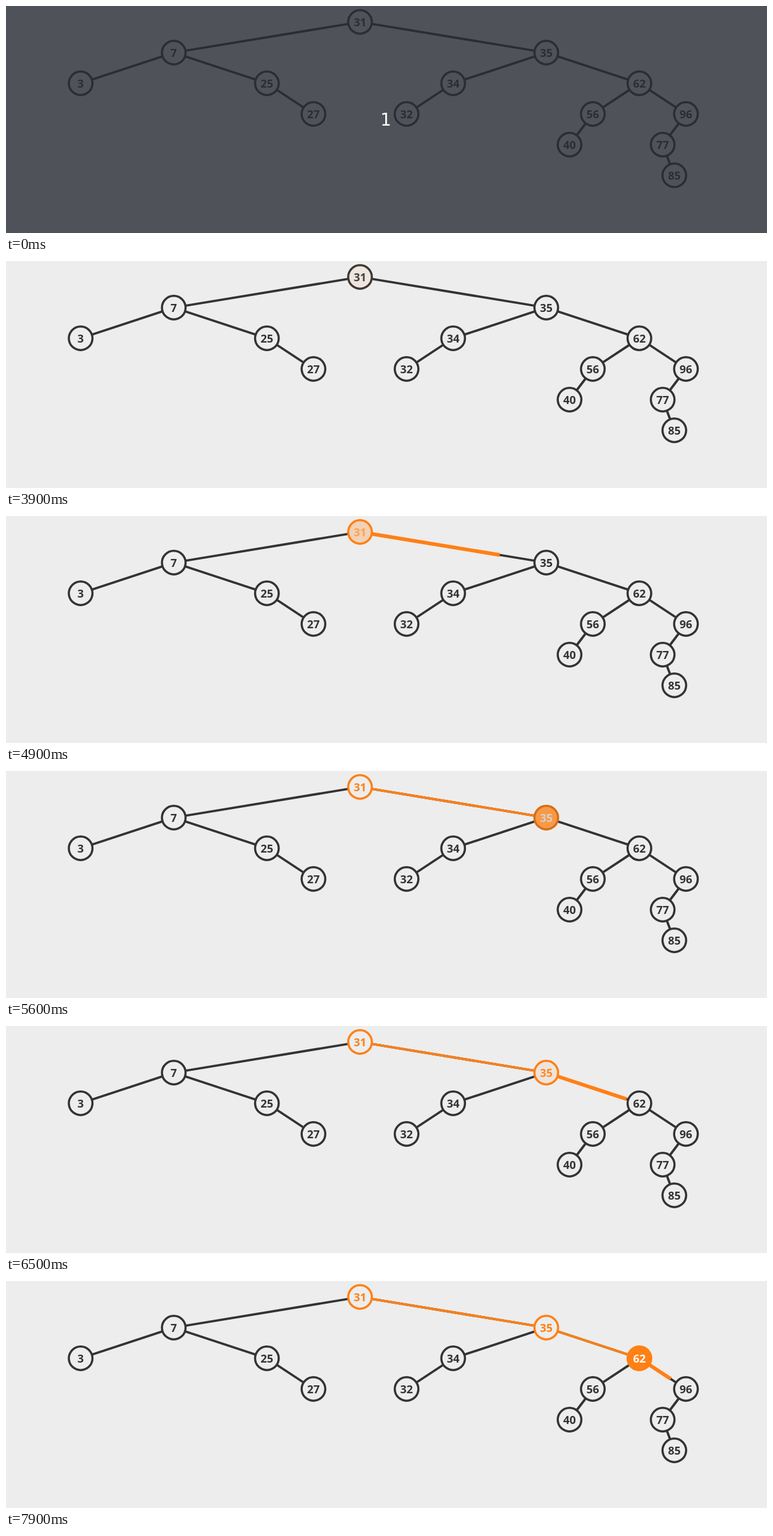
An HTML page for the animation above (8000 ms loop, 1236 px wide and 370 px high).

```html
<!DOCTYPE html>
<html lang="en">
<head>
<meta charset="utf-8">
<title>Tree search</title>
<style>
html, body { margin: 0; width: 100%; height: 100%; overflow: hidden; background: #ededed; }
svg { display: block; width: 1236px; height: 370px; }
.edge { stroke: #333; stroke-width: 3.8; }
circle { fill: #ededed; stroke: #333; stroke-width: 3.5; }
text { text-anchor: middle; }
.key { font: 700 18px "PT Sans", "Open Sans", "Noto Sans", sans-serif; fill: #333; }
.count { font: 28px "DejaVu Sans", sans-serif; fill: #fff; }
</style>
</head>
<body>
<svg viewBox="0 0 1236 370">
  <g id="edges"></g>
  <g id="trail"></g>
  <g id="nodes"></g>
  <g id="cover">
    <rect width="1236" height="370" fill="#282c34" fill-opacity=".8"/>
    <text class="count" x="617" y="195">1</text>
  </g>
</svg>
<script>
const LOOP = 8000, STEP = 100;
const BG = [237, 237, 237], DARK = [51, 51, 51], WHITE = [255, 255, 255], ORANGE = [255, 128, 20];
const THIN = 3.8, THICK = 6;

// Each key is placed by its left/right path from the root.
const tree = {
  31: '', 7: 'L', 35: 'R', 3: 'LL', 25: 'LR', 34: 'RL', 62: 'RR',
  27: 'LRR', 32: 'RLL', 56: 'RRL', 96: 'RRR', 40: 'RRLL', 77: 'RRRL', 85: 'RRRLR'
};

// Times in ms; a visit fills a node, then a trail runs towards the next one.
const visits = [
  { key: 31, next: 35, rise: 3770, run: 4465, fade: 4600, settle: 250 },
  { key: 35, next: 62, rise: 5290, run: 6000, fade: 6135, settle: 120 },
  { key: 62, next: 96, rise: 6790, run: 7510, fade: Infinity, settle: 250 }
];
const FADE = 500, RUN = 580;

const byId = id => document.getElementById(id);
const clamp = v => Math.max(0, Math.min(1, v));
const ease = t => t < .5 ? 4 * t ** 3 : 1 - 4 * (1 - t) ** 3;
const blend = (a, b, p) => a.map((v, i) => v + (b[i] - v) * p);
const rgb = c => `rgb(${c.map(Math.round)})`;

function add(parent, tag, attrs) {
  const el = document.createElementNS('http://www.w3.org/2000/svg', tag);
  set(el, attrs);
  return parent.appendChild(el);
}

function set(el, attrs) {
  for (const name in attrs) el.setAttribute(name, attrs[name]);
}

function place(path) {
  let x = 575, gap = 302.5;
  for (const side of path) {
    x += side === 'L' ? -gap : gap;
    gap /= 2;
  }
  return { x, y: 26 + 50 * path.length };
}

const nodes = {};
for (const [key, path] of Object.entries(tree)) {
  const { x, y } = place(path);
  if (path) {
    const from = place(path.slice(0, -1));
    add(byId('edges'), 'line', { class: 'edge', x1: from.x, y1: from.y, x2: x, y2: y });
  }
  const ring = add(byId('nodes'), 'circle', { cx: x, cy: y, r: 19.2 });
  const label = add(byId('nodes'), 'text', { class: 'key', x, y: y + 6.7 });
  label.textContent = key;
  nodes[key] = { x, y, ring, label };
}

for (const v of visits) {
  const { x, y } = nodes[v.key];
  v.line = add(byId('trail'), 'line', { x1: x, y1: y, stroke: rgb(ORANGE) });
}

function draw(t) {
  byId('cover').style.display = t < STEP ? '' : 'none';
  for (const v of visits) {
    const a = nodes[v.key], b = nodes[v.next];
    const rise = ease(clamp((t - v.rise) / FADE));
    const fade = ease(clamp((t - v.fade) / FADE));
    a.ring.style.fill = rgb(blend(BG, ORANGE, rise - fade));
    a.ring.style.stroke = rgb(blend(DARK, ORANGE, rise));
    a.label.style.fill = rgb(blend(blend(DARK, WHITE, rise), ORANGE, fade));

    const run = clamp((t - v.run) / RUN);
    const settle = clamp((t - v.run - RUN) / v.settle);
    v.line.style.display = run > 0 ? '' : 'none';
    set(v.line, {
      x2: a.x + (b.x - a.x) * run,
      y2: a.y + (b.y - a.y) * run,
      'stroke-width': THICK + (THIN - THICK) * settle
    });
  }
}

const start = performance.now();
function tick() {
  const t = (performance.now() - start) % LOOP;
  draw(Math.floor(t / STEP) * STEP);
  requestAnimationFrame(tick);
}
tick();
</script>
</body>
</html>
```
